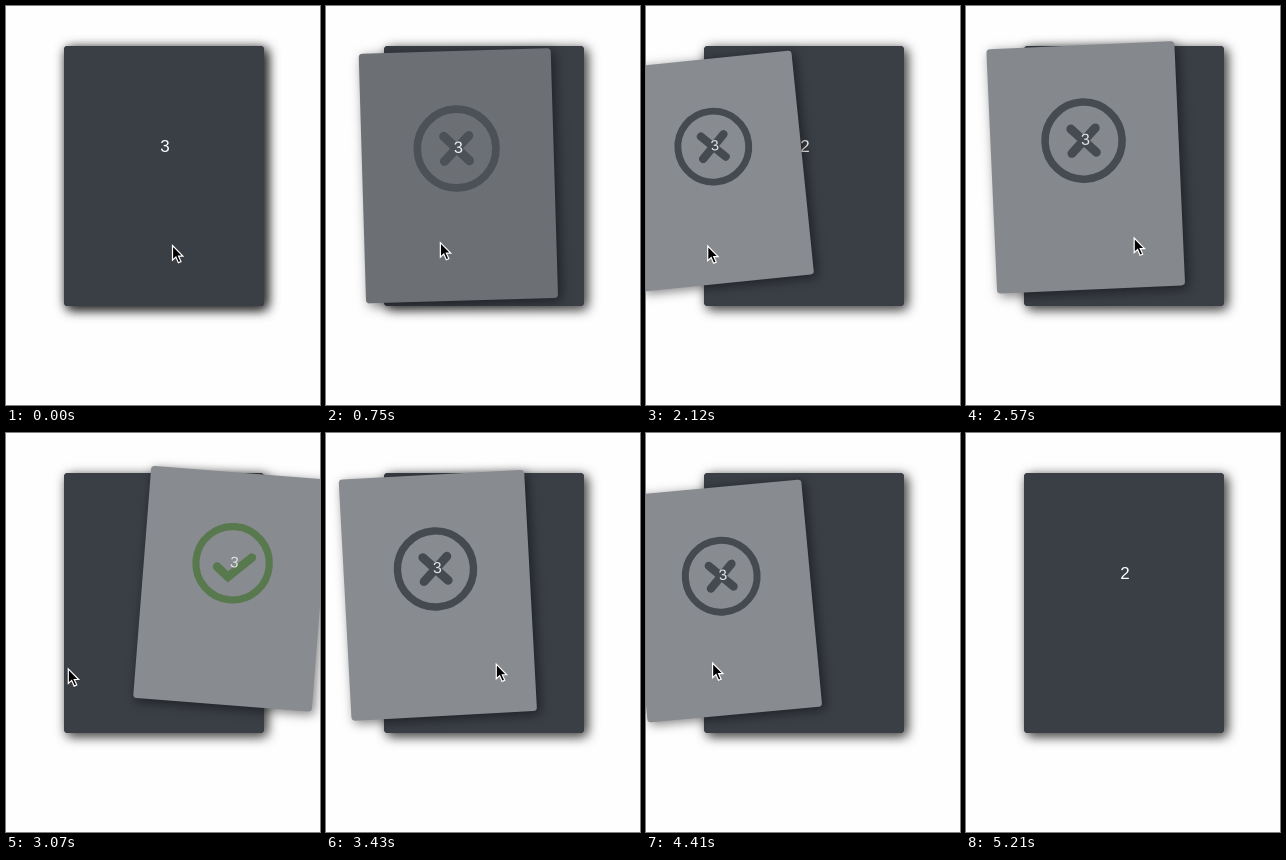
Recreate the animation shown at these times as an HTML page. Size 314 px wide and 399 px high, loop 5.69 s.

```html
<!DOCTYPE html>
<html lang="en">
<head>
<meta charset="utf-8">
<title>Swipe cards</title>
<style>
html, body { margin: 0; width: 100%; height: 100%; overflow: hidden; background: #fefefe; }
.card {
  position: absolute; left: 58px; top: 40px; width: 200px; height: 260px;
  border-radius: 4px; background: #3a3e45; box-shadow: 3px 3px 12px rgba(0, 0, 0, .5);
}
svg { position: absolute; left: 0; top: 0; overflow: visible; }
.card svg { width: 200px; height: 260px; }
text { font: 17px "Liberation Sans", Arial, sans-serif; text-anchor: middle; fill: #fff; }
.icon { fill: none; stroke-width: 8; stroke-linecap: round; }
.mark { stroke-width: 9.5; }
</style>
</head>
<body>
<div class="card"></div>
<div class="card"><svg><text x="101" y="106">2</text></svg></div>
<div class="card" id="top">
  <svg>
    <g transform="translate(99 101.5)">
      <g class="icon" id="no" stroke="#454950">
        <circle r="41"/>
        <path class="mark" d="M-13-13L13 13M-13 13L13-13"/>
      </g>
      <g class="icon" id="yes" stroke="#58784d">
        <circle r="41"/>
        <path class="mark" d="M-17 5L-4 15.5L21-8"/>
      </g>
    </g>
    <text id="label" x="101" y="106">3</text>
  </svg>
</div>
<svg width="20" height="24" id="cursor">
  <path d="M0 0V14.6L3.4 11.5L5.9 17.2L8.5 16.1L6 10.6H10.4Z" fill="#000" stroke="#fff" stroke-width="1.2"/>
</svg>
<script>
const LOOP = 5690, LAG = 110, RELEASE = 4600, GONE = 5000, HOME_X = 166.5;

// Turning points of the hand: time, distance from the start, height on the stage
const turns = [
  [507, 0, 239.5], [784, -54, 236.5], [1520, 77, 237], [2135, -105, 240],
  [2935, 82, 226], [3080, -106, 236], [3700, 76, 228], [3840, 4, 228],
  [3960, 70, 228], [4400, -100, 230], [5200, 78, 420]
];

const clamp = v => Math.min(1, Math.max(0, v));
const swing = u => (1 - Math.cos(Math.PI * clamp(u))) / 2;
const lerp = (a, b, u) => a + (b - a) * u;
const mix = (from, to, k) => `rgb(${from.map((v, i) => Math.round(lerp(v, to[i], k)))})`;

function hand(t) {
  const next = turns.findIndex(turn => turn[0] > t);
  const i = next < 0 ? turns.length - 1 : Math.max(1, next);
  const [t0, x0, y0] = turns[i - 1], [t1, x1, y1] = turns[i];
  const u = swing((t - t0) / (t1 - t0));
  return [lerp(x0, x1, u), lerp(y0, y1, u)];
}

const [card, no, yes, label, cursor] =
  ["top", "no", "yes", "label", "cursor"].map(id => document.getElementById(id));

function draw(now) {
  const t = now % LOOP;
  const [handX, handY] = hand(t);
  cursor.style.transform = `translate(${HOME_X + handX}px, ${handY}px)`;

  // The card trails the hand until it is thrown off to the left
  const thrown = clamp((t - RELEASE) / (GONE - RELEASE));
  const x = hand(Math.min(t, RELEASE) - LAG)[0] - 330 * thrown * thrown;
  const lift = Math.sin(Math.PI * clamp((t - 560) / 4700)) ** 2;
  const y = -lift * (11 + .05 * Math.max(x, -100));
  const reach = Math.abs(x), k = clamp(reach / 40);
  const scale = Math.max(.84, 1 - reach * .00155);
  card.style.transform = `translate(${x}px, ${y}px) rotate(${x / 15}deg) scale(${scale})`;
  card.style.background = mix([58, 62, 69], [136, 139, 143], k);
  card.style.visibility = t < GONE ? "visible" : "hidden";
  no.style.opacity = x < 0 ? Math.sqrt(k) : 0;
  yes.style.opacity = x > 0 ? Math.sqrt(k) : 0;
  label.style.fill = mix([255, 255, 255], [226, 228, 228], k);
  requestAnimationFrame(draw);
}
requestAnimationFrame(draw);
</script>
</body>
</html>
```
